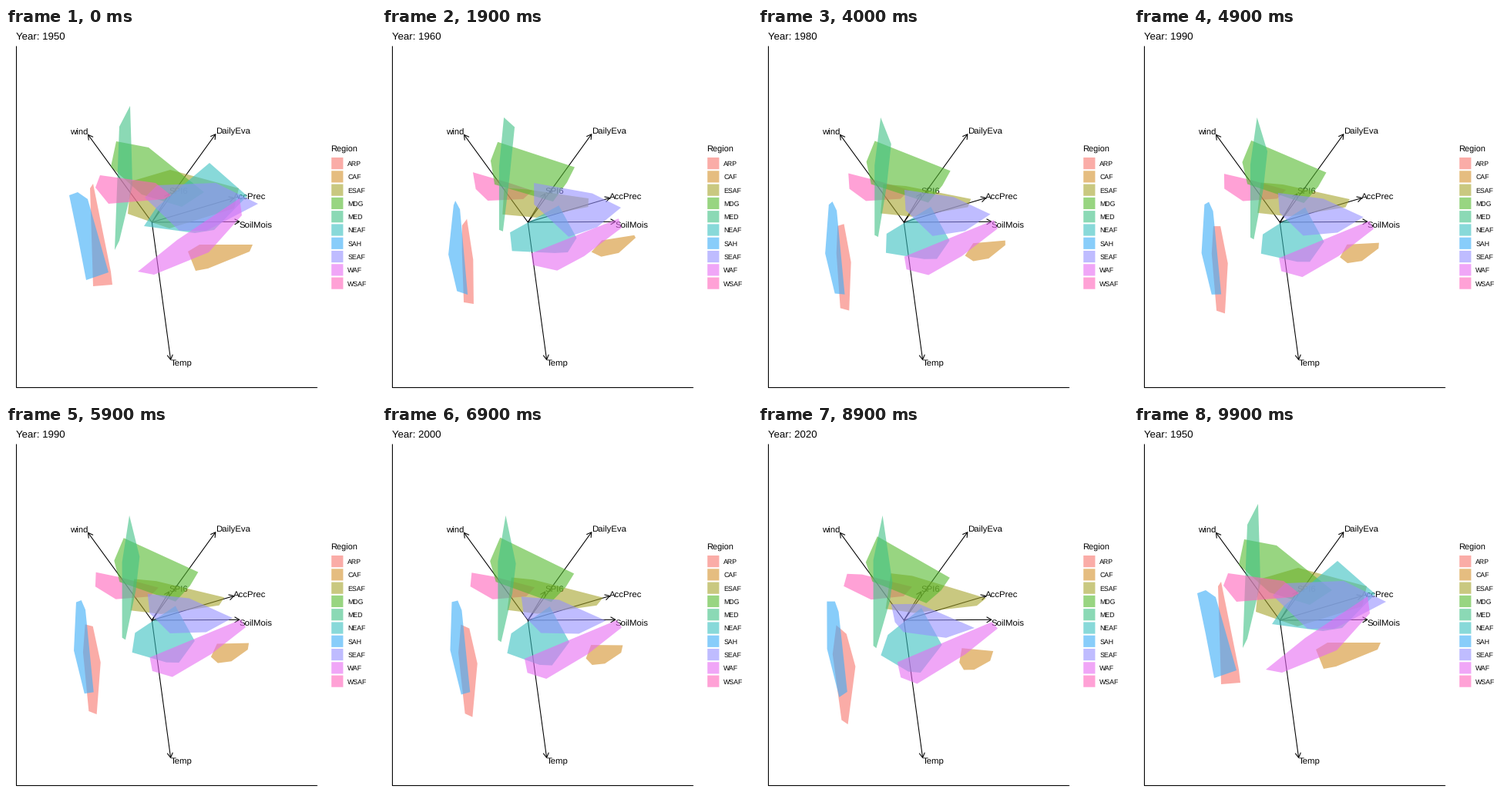
Write a matplotlib script that moves like this. It is 480x480 px and loops after 10 s.

```python
import numpy as np
import matplotlib.pyplot as plt
from matplotlib.animation import FuncAnimation
from matplotlib.patches import Polygon, Rectangle

plt.rcParams["font.family"] = "Liberation Sans"
plt.rcParams["text.hinting"] = "none"

SIZE, DPI = 480, 72
FRAMES, INTERVAL = 100, 100
LINE = 1.07
ALPHA = 0.6
YEARS = range(1950, 2030, 10)
# First and last frame of the move away from each year
MOVES = [(4, 15), (17, 27), (30, 41), (43, 52),
         (55, 65), (68, 77), (80, 89), (92, 99)]

regions = []


def region(name, color, start, early, late):
    """Outlines for 1950, 1960 and 2010; the other decades follow the trend."""
    start, early, late = (np.array(s, float) for s in (start, early, late))
    trend = [early + (year - 1960) / 50 * (late - early) for year in YEARS[1:]]
    regions.append((name, color, [start, *trend, start]))


region("ARP", "#F8766D",
       [(109, 208), (113, 202), (136, 316), (138, 333), (113, 335), (111, 270)],
       [(104, 256), (110, 247), (118, 300), (119, 357), (106, 355), (104, 290)],
       [(102, 258), (114, 266), (125, 310), (117, 382), (108, 377), (98, 295)])
region("CAF", "#D4922B",
       [(251, 281), (320, 281), (316, 290), (262, 312), (246, 315), (236, 290)],
       [(286, 275), (328, 268), (330, 271), (308, 291), (285, 296), (272, 290)],
       [(268, 286), (309, 288), (306, 299), (285, 312), (270, 313), (263, 304)])
region("ESAF", "#A6A42B",
       [(162, 199), (213, 184), (302, 208), (296, 234), (212, 260), (158, 241)],
       [(158, 208), (188, 210), (267, 221), (267, 232), (200, 246), (156, 242)],
       [(170, 194), (198, 197), (291, 223), (281, 233), (202, 243), (164, 238)])
region("MDG", "#54B92E",
       [(143, 147), (185, 155), (257, 213), (228, 232), (176, 216), (136, 180)],
       [(150, 148), (250, 180), (240, 200), (222, 225), (146, 203), (141, 172)],
       [(154, 144), (249, 194), (238, 211), (219, 229), (148, 202), (140, 176)])
region("MED", "#3EC184",
       [(147, 128), (161, 101), (163, 165), (164, 205), (147, 276), (141, 288)],
       [(152, 180), (158, 116), (172, 126), (165, 195), (157, 263), (152, 261)],
       [(150, 175), (161, 116), (174, 190), (170, 222), (154, 284), (150, 281)])
region("NEAF", "#39C1C1",
       [(264, 175), (313, 218), (270, 262), (245, 266), (179, 257), (195, 233)],
       [(230, 230), (253, 272), (242, 290), (225, 291), (169, 289), (166, 265)],
       [(215, 235), (241, 282), (216, 315), (200, 314), (161, 296), (168, 270)])
region("SAH", "#39ACF8",
       [(82, 217), (93, 213), (106, 222), (133, 317), (104, 327), (93, 270)],
       [(93, 230), (95, 224), (101, 235), (111, 346), (97, 341), (86, 294)],
       [(90, 228), (99, 227), (104, 240), (115, 345), (104, 350), (89, 290)])
region("SEAF", "#9590FF",
       [(196, 204), (272, 201), (327, 228), (260, 263), (225, 263), (180, 220)],
       [(198, 200), (275, 214), (311, 232), (280, 258), (244, 271), (198, 228)],
       [(177, 226), (220, 228), (286, 257), (250, 272), (198, 268), (181, 250)])
region("WAF", "#E76BF3",
       [(303, 221), (306, 243), (263, 291), (192, 320), (171, 316), (222, 275)],
       [(307, 247), (311, 259), (262, 296), (228, 314), (196, 307), (194, 292)],
       [(304, 253), (311, 262), (268, 296), (210, 331), (187, 323), (183, 304)])
region("WSAF", "#FF62BC",
       [(122, 191), (194, 201), (214, 217), (205, 222), (133, 228), (116, 207)],
       [(118, 187), (165, 201), (195, 211), (183, 222), (137, 224), (122, 209)],
       [(116, 191), (140, 194), (199, 209), (188, 221), (145, 225), (113, 208)])

fig = plt.figure(figsize=(SIZE / DPI, SIZE / DPI), dpi=DPI, facecolor="white")
ax = fig.add_axes([0, 0, 1, 1])
ax.set(xlim=(0, SIZE), ylim=(SIZE, 0))
ax.axis("off")


def stroke(xs, ys):
    ax.plot(xs, ys, color="black", lw=LINE, solid_capstyle="butt",
            solid_joinstyle="round", snap=False, zorder=2)


def label(x, y, text, size, ha="left"):
    return ax.text(x, y, text, size=size, ha=ha, va="baseline", zorder=3)


def arrow(tip, head=7.2, start=(189.3, 252)):
    stroke(*zip(start, tip))
    back = np.arctan2(start[1] - tip[1], start[0] - tip[0])
    wings = [(tip[0] + head * np.cos(back + d), tip[1] + head * np.sin(back + d))
             for d in (-np.pi / 6, np.pi / 6)]
    stroke(*zip(wings[0], tip, wings[1]))


stroke([13.5, 13.5, 404], [23.5, 466.5, 466.5])
title = label(13, 15, "", 13.2)

for text, tip, x, base, ha in [
        ("wind", (106.5, 138.5), 106.3, 139, "right"),
        ("DailyEva", (271.8, 137.8), 272, 138, "left"),
        ("SPI6", (211.7, 215), 211.3, 215, "left"),
        ("AccPrec", (295.5, 220.5), 295, 222, "left"),
        ("SoilMois", (302.8, 251.3), 302.8, 260, "left"),
        ("Temp", (213.6, 430.3), 213.8, 438, "left")]:
    arrow(tip)
    label(x, base, text, 11.38, ha)

label(420.8, 160.6, "Region", 11)
hulls = []
for i, (name, color, shapes) in enumerate(regions):
    y = 175.6 + 17.28 * i
    style = dict(fc=color, lw=0, alpha=ALPHA, snap=False)
    ax.add_patch(Rectangle((422.2, y - 7.6), 15.2, 15.2, **style))
    label(443.4, y + 3.3, name, 8.8)
    hulls.append(ax.add_patch(Polygon(shapes[0], zorder=5 + i, **style)))


def draw(frame):
    i = next(k for k, (_, stop) in enumerate(MOVES) if frame <= stop)
    start, stop = MOVES[i]
    t = max(0, (frame - start) / (stop - start))
    year = YEARS[(i + (t > 0.5)) % len(YEARS)]
    title.set_text(f"Year: {year}")
    for hull, (_, _, shapes) in zip(hulls, regions):
        hull.set_xy(shapes[i] + t * (shapes[i + 1] - shapes[i]))
    # The last region lies on top in the first year only
    hulls[-1].set_zorder(20 if year == YEARS[0] else 4)
    return [title, *hulls]


anim = FuncAnimation(fig, draw, frames=FRAMES, interval=INTERVAL, repeat=True)
plt.show()
```
